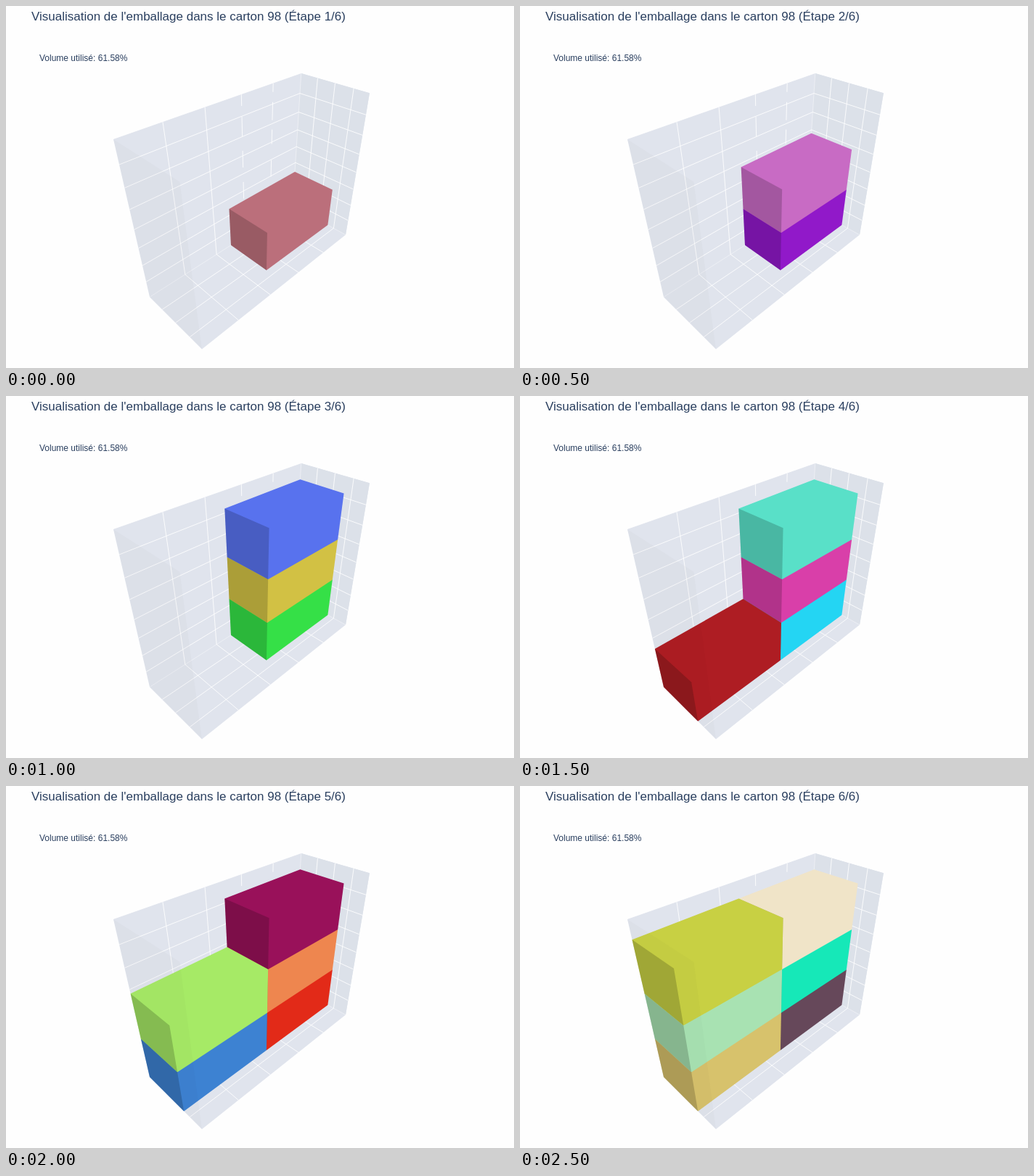
An HTML page for the animation above (3 s loop, 700 by 500 pixels).

```html
<!DOCTYPE html>
<html lang="fr">
<head>
<meta charset="utf-8">
<style>
  html, body { margin: 0; width: 100%; height: 100%; overflow: hidden; background: #fefefe; }
  svg { display: block; width: 700px; height: 500px; }
  text { font-family: "Liberation Sans", Arial, sans-serif; fill: #2a3f5f; }
  #grid { stroke: #fff; stroke-width: 1; fill: none; }
</style>
</head>
<body>
<svg viewBox="0 0 700 500">
  <g id="walls"></g>
  <g id="grid"></g>
  <g id="boxes"></g>
  <g id="side"></g>
  <text id="title" x="35" y="20" font-size="17"></text>
  <text x="46" y="76" font-size="12">Volume utilisé: 61.58%</text>
</svg>
<script>
const STEP_MS = 500;
// Carton and item sizes: length, depth, height.
const [L, D, H] = [50, 19, 40];
const [l, d, h] = [25, 13, 12];

// Item colours at each step, in packing order.
const palettes = [
  ['#bb6f7b'],
  ['#9119c9', '#c86bc4'],
  ['#35e047', '#d2c144', '#5872ee'],
  ['#24d5f3', '#d93fa9', '#59e0c8', '#ae1d23'],
  ['#e22a18', '#ee864f', '#99115a', '#3d82d2', '#a6ea66'],
  ['#66485a', '#16e8b8', '#f0e4c8', '#d7c26c', '#a8e2b2', '#c8d043'],
];

const $ = id => document.getElementById(id);

// Perspective projection built from the three vanishing points.
function project([x, y, z]) {
  const a = 0.3176 * x / L, b = -0.1221 * y / D, c = -0.2533 * z / H;
  const w = 1 + a + b + c;
  return [
    (198 + 1015.3 * a - 319.7 * b + 345.4 * c) / w,
    (402 - 120.7 * a - 115.7 * b + 1044.5 * c) / w,
  ].map(n => n.toFixed(2));
}

const points = list => list.map(project).join(' ');
const poly = (fill, ...list) => `<polygon fill="${fill}" points="${points(list)}"/>`;
const line = (list, opacity = 0.85, dash = 'none') =>
  `<polyline points="${points(list)}" opacity="${opacity}" stroke-dasharray="${dash}"/>`;

function drawCarton() {
  $('walls').innerHTML =
    poly('#e0e4ed', [0, 0, H], [L, 0, H], [L, D, H], [L, D, 0], [0, D, 0], [0, 0, 0]) +
    poly('#dce1e9', [L, 0, H], [L, D, H], [L, D, 0], [L, 0, 0]);
  $('side').innerHTML =
    poly('rgba(0,0,0,.02)', [0, 0, H], [0, D, H], [0, D, 0], [0, 0, 0]);

  const dashes = { 30: '16 15 27 20 23 20 23 20', 40: '12 14 25 13 20 22 23 20' };
  let grid = '';
  for (let x = 10; x < L; x += 10) {
    grid += line([[x, 0, H], [x, 0, 0]], 0.85, dashes[x]) + line([[x, 0, 0], [x, D, 0]]);
  }
  for (let y = 5; y < D; y += 5) grid += line([[0, y, 0], [L, y, 0], [L, y, H]]);
  for (let z = 5; z < H; z += 5) grid += line([[0, 0, z], [L, 0, z], [L, D, z]]);
  grid += line([[0, 0, 0], [L, 0, 0], [L, D, 0]], 0.4) + line([[L, 0, 0], [L, 0, H]], 0.4);
  $('grid').innerHTML = grid;
}

// Items fill the far column from the floor up, then the near one.
function box(color, i) {
  const x = i < 3 ? l : 0, z = (i % 3) * h, X = x + l, Z = z + h;
  return poly(color, [x, 0, Z], [X, 0, Z], [X, d, Z], [X, d, z], [x, d, z], [x, 0, z]) +
    poly('rgba(0,0,0,.185)', [x, 0, Z], [x, d, Z], [x, d, z], [x, 0, z]);
}

let shown = -1;
function frame() {
  const step = Math.floor(performance.now() / STEP_MS) % palettes.length;
  if (step !== shown) {
    shown = step;
    $('boxes').innerHTML = palettes[step].map(box).join('');
    $('title').textContent =
      `Visualisation de l'emballage dans le carton 98 (Étape ${step + 1}/${palettes.length})`;
  }
  requestAnimationFrame(frame);
}

drawCarton();
frame();
</script>
</body>
</html>
```
